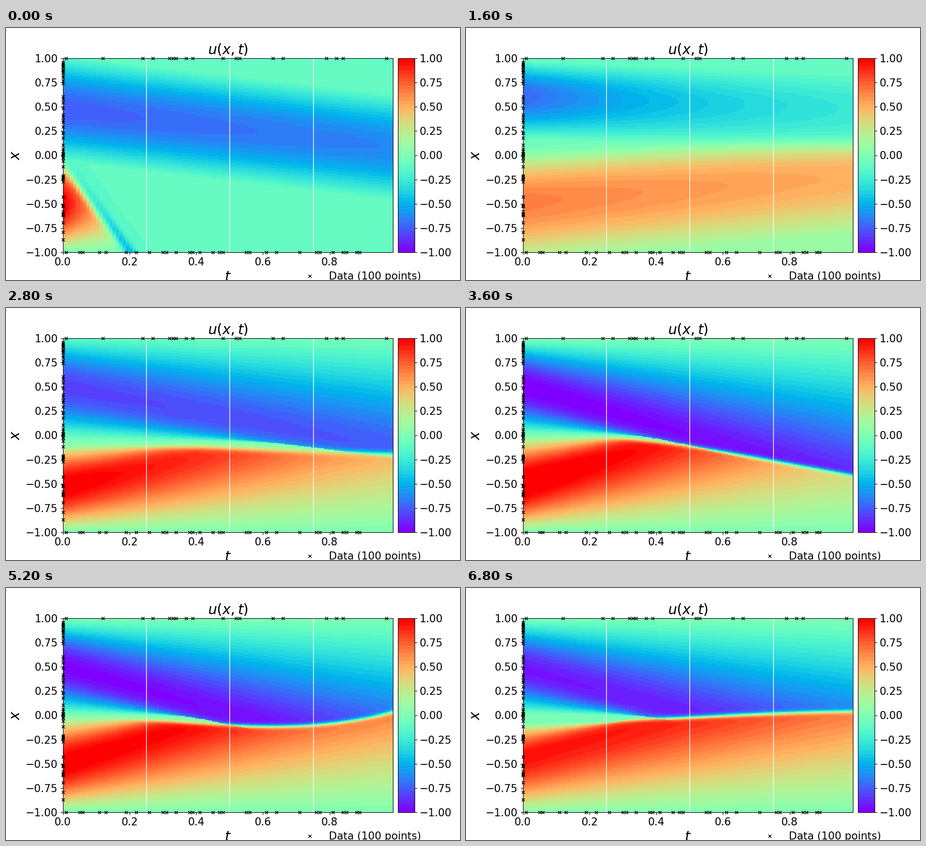
Write a matplotlib script that moves like this. It is 900 px wide and 500 px high and loops after 7200 ms.

```python
import matplotlib.pyplot as plt
import numpy as np
from matplotlib.animation import FuncAnimation
from mpl_toolkits.axes_grid1 import make_axes_locatable

SLOTS, STEP_MS = 18, 400
HOLD = 2                        # the opening picture stays for two slots
T = np.linspace(0, 0.99, 100)
X = np.linspace(-1, 1, 256)     # symmetric, so reversing it mirrors a wave
XI = np.linspace(-2, 2, 801)
FRONT_T = (0, 0.3, 0.6, 1)


def wave(peak=1, centre=0.5, inner=0.5, outer=0.5, floor=0,
         speed=1, drift=0, decay=0.1):
    """A cosine hump that travels inwards, faster where it is higher."""
    return [peak, centre, inner, outer, floor, speed, drift, decay]


def stage(cold, warm, front, width=0.012, wake=0):
    """Two opposite waves meeting at a front given at the FRONT_T times."""
    return np.array([*cold, *warm, *front, width, wake], float)


STAGES = {
    HOLD - 1: stage(
        wave(0.75, 0.48, 0.54, 0.54, floor=0.12, speed=0, drift=0.4,
             decay=0.2),
        wave(speed=0, decay=5.5),
        -0.13 - 4.9 * np.array(FRONT_T), 0.035, wake=1.8),
    2: stage(
        wave(0.84, 0.53, 0.65, 0.43, floor=0.07, speed=0.05, drift=0.45,
             decay=0.18),
        wave(speed=0, decay=5.5),
        -0.07 - 4 * np.array(FRONT_T), 0.035, wake=1.4),
    4: stage(
        wave(0.72, 0.62, 0.45, 0.36, floor=0.1, speed=0, drift=0.14,
             decay=1.3),
        wave(0.66, 0.48, 0.5, 0.62, floor=0.1, speed=0, drift=0.27,
             decay=0.32),
        (0.05, 0.08, 0.1, 0.11), 0.05),
    6: stage(
        wave(0.6, 0.5, 0.62, 0.62, speed=0.45, drift=0.05),
        wave(0.97, 0.56, 0.4, 0.45, speed=0.5, decay=0.5),
        (-0.22, -0.2, -0.12, 0.08), 0.025),
    9: stage(
        wave(decay=0.08),
        wave(1.08, speed=0.93, decay=0.35),
        (0, -0.035, -0.172, -0.415)),
    13: stage(
        wave(0.98, decay=0.05),
        wave(1.02, decay=0.15),
        (0, -0.06, -0.113, 0.04)),
    17: stage(
        wave(0.93, 0.47, 0.47, 0.53, decay=0.05),
        wave(0.95, 0.42, 0.35, 0.6, speed=0.95),
        (-0.1, -0.055, -0.003, 0.04)),
}


def travel(params):
    """Height of one wave on the grid, followed along its characteristics."""
    peak, centre, inner, outer, floor, speed, drift, decay = params
    half = np.where(XI < centre, inner, outer)
    rise = np.cos(np.pi / 2 * np.clip((XI - centre) / half, -1, 1))
    pace = speed * (floor + (peak - floor) * rise) + drift
    columns = []
    for t in T:
        place = XI - pace * t
        # keep only the outer sheet where the wave has folded over
        place = np.minimum.accumulate(place[::-1])[::-1]
        height = floor + (peak - floor) * np.exp(-decay * t) * rise
        columns.append(np.interp(X, place, height))
    return np.array(columns).T


def stage_at(slot):
    """Parameters for a slot, easing out from one stage to the next."""
    slot = max(slot, HOLD - 1)
    lo = max(s for s in STAGES if s <= slot)
    hi = min(s for s in STAGES if s >= slot)
    w = (slot - lo) / max(hi - lo, 1)
    w = 1 - (1 - w) ** 2
    return STAGES[lo] * (1 - w) + STAGES[hi] * w


def field(slot):
    p = stage_at(slot)
    cold, warm = -travel(p[:8]), travel(p[8:16])[::-1]
    front = np.polyval(np.polyfit(FRONT_T, p[16:20], 3), T)
    width, wake = p[20:]
    gap = X[:, None] - front
    side = (1 - np.tanh(gap / (2 * width))) / 2
    trail = wake * np.minimum(T, 0.25) * np.exp(-((gap - 0.1) / 0.09) ** 2)
    return warm * side + cold * (1 - side) - trail


# Training points: both walls in hundredths of t, the rest random at t = 0
bottom = [1, 5, 6, 11, 13, 19, 22, 26, 30, 31, 34, 38, 39, 41, 45, 47, 48,
          55, 56, 61, 64, 71, 76, 77, 81, 84, 85, 88, 89]
top = [1, 12, 24, 27, 32, 33, 34, 37, 39, 48, 52, 53, 63, 66, 79, 82, 84, 97]
start = np.random.default_rng(4).uniform(-0.95, 0.99, 53)

fig = plt.figure(figsize=(9, 5), dpi=100)
ax = fig.add_subplot(111)
image = ax.imshow(field(0), interpolation='nearest', origin='lower',
                  cmap=plt.get_cmap('rainbow', 50), vmin=-1, vmax=1,
                  extent=[0, 0.99, -1, 1], aspect='auto')
cax = make_axes_locatable(ax).append_axes('right', size='5%', pad=0.10)
quarters = np.linspace(-1, 1, 9)
bar = fig.colorbar(image, cax=cax, ticks=quarters)
bar.ax.tick_params(labelsize=15)

px = np.concatenate([np.array(bottom + top) / 100, np.zeros(len(start))])
py = np.concatenate([-np.ones(len(bottom)), np.ones(len(top)), start])
ax.plot(px, py, 'kx', markersize=4, clip_on=False,
        label='Data (100 points)')
for t in (0.25, 0.5, 0.75):
    ax.plot([t, t], [-1, 1], 'w-', linewidth=1)
ax.set(xlim=(0, 0.99), ylim=(-1, 1), yticks=quarters)
ax.set_xlabel('$t$', size=20)
ax.set_ylabel('$x$', size=20)
ax.set_title('$u(x,t)$', fontsize=20)
ax.tick_params(labelsize=15)
ax.legend(loc='upper center', bbox_to_anchor=(0.9, -0.05), ncol=5,
          frameon=False, prop={'size': 15})


def draw(slot):
    image.set_data(field(slot))
    return [image]


anim = FuncAnimation(fig, draw, frames=SLOTS, interval=STEP_MS, repeat=True)
plt.show()
```
